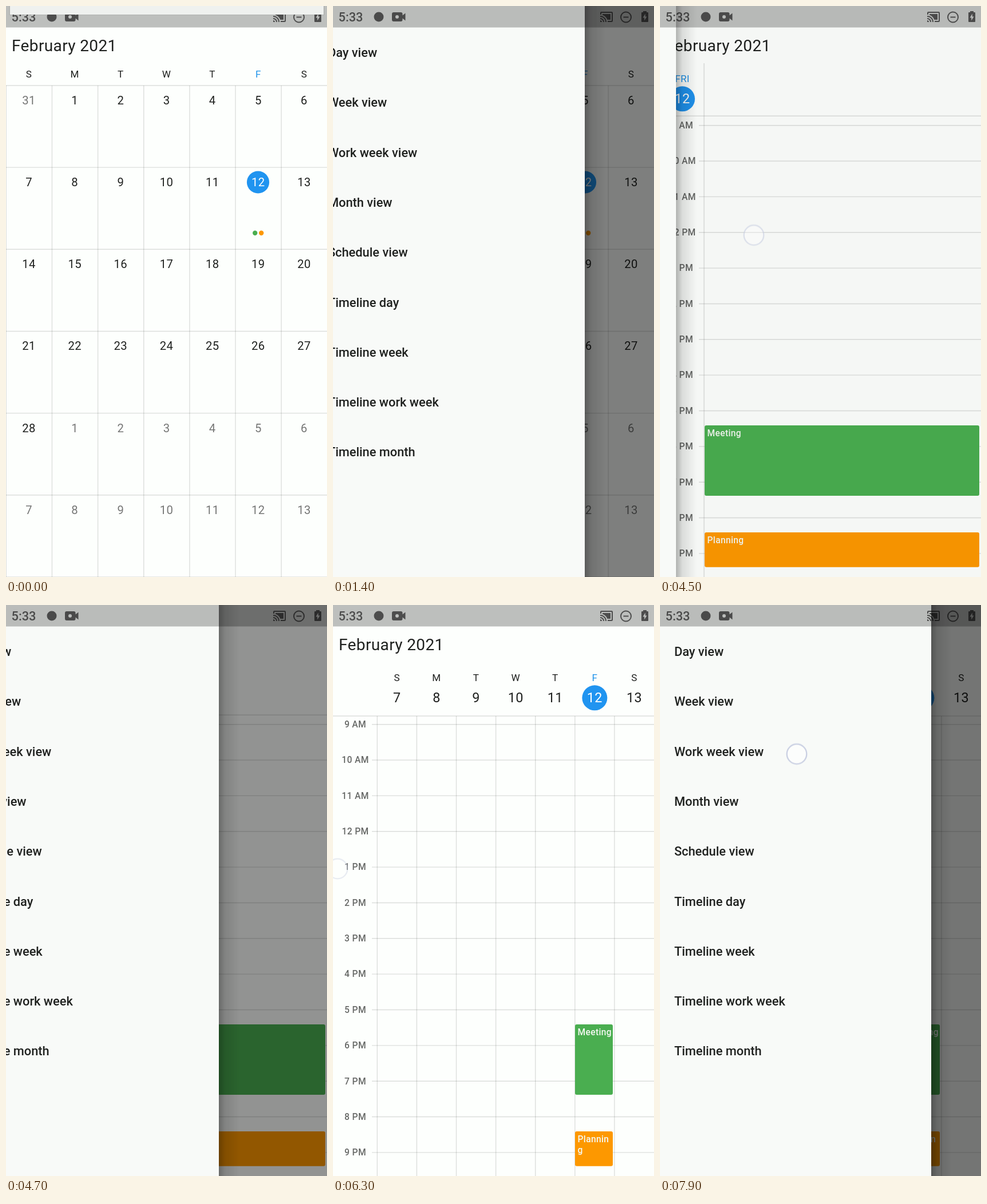
These frames come from a looping animation (561 by 998 pixels, 8 s). An HTML page:

```html
<!DOCTYPE html>
<html lang="en">
<head>
<meta charset="utf-8">
<title>Calendar views</title>
<style>
  @property --edge { syntax: "<number>"; inherits: true; initial-value: -120; }

  html, body { margin: 0; width: 100%; height: 100%; overflow: hidden; background: #fdfffd; }
  svg {
    display: block; width: 100%; height: 100%;
    font-family: Roboto, "Open Sans", sans-serif;
    animation: edge 8s step-end infinite;
  }
  text { fill: #1f211f; white-space: pre; }
  .view text { letter-spacing: .35px; }
  .view .mid { text-anchor: middle; }
  .view .dim { fill: #757675; }
  .view .hour { fill: #666866; font-weight: 500; }
  .view .today { fill: #2094ea; }
  .view .on { fill: #fff; }
  .view .event { fill: #f4f8f2; font-weight: 500; }
  .line { stroke: #000; stroke-opacity: .13; stroke-width: 1.4; }

  .view, #touch, #panel, .bar { animation: 8s step-end infinite; }
  #month { animation-name: month; }
  #day { animation-name: day; }
  #week { animation-name: week; }
  .bar { animation-name: bar; }
  #touch { animation-name: touch; }
  #panel { animation-name: panel; }

  #scrim { fill: #000; opacity: calc(var(--edge) / 474 * .54); }
  #drawer { transform: translateX(calc(var(--edge) * 1px - 474px)); }
  #drawer text { font-size: 21.8px; font-weight: 500; }

  /* right edge of the drawer: three openings, two closings */
  @keyframes edge {
    0%, 41.25%, 75% { --edge: -120; }
    13.75%, 56.25%, 86.25% { --edge: 28; }
    15%, 57.5%, 87.5% { --edge: 211; }
    16.25%, 58.75%, 88.75% { --edge: 372; }
    17.5%, 60%, 90% { --edge: 440; }
    18.75%, 61.25%, 91.25% { --edge: 466; }
    20%, 62.5%, 92.5%, 100% { --edge: 474; }
    40%, 71.25% { --edge: 462; }
    72.5% { --edge: 230; }
    73.75% { --edge: 70; }
  }
  @keyframes month { 0% { opacity: 1; } 36.25%, 100% { opacity: 0; } }
  @keyframes day { 0%, 67.5%, 100% { opacity: 0; } 40% { opacity: 1; } }
  @keyframes week { 0% { opacity: 0; } 68.75%, 100% { opacity: 1; } }
  @keyframes bar {
    0%, 48.75%, 75%, 100% { opacity: 0; }
    40%, 68.75% { opacity: 1; }
    46.25%, 72.5% { opacity: .65; }
    47.5%, 73.75% { opacity: .3; }
  }
  @keyframes panel {
    0% { transform: translateY(0); }
    1.25% { transform: translateY(-5px); }
    2.5% { transform: translateY(-9px); }
    3.75% { transform: translateY(-13px); }
    5%, 100% { transform: translateY(-40px); }
  }
  @keyframes touch {
    0%, 16.25%, 31.25%, 58.75%, 67.5%, 88.75% { opacity: 0; transform: none; }
    11.25% { opacity: 1; transform: translate(8px, 430px); }
    12.5% { opacity: 1; transform: translate(80px, 436px); }
    13.75% { opacity: .6; transform: translate(164px, 442px); }
    15% { opacity: .4; transform: translate(250px, 446px); }

    27.5%, 30% { opacity: .4; transform: translate(263.5px, 79px); }
    28.75% { opacity: 1; transform: translate(263.5px, 79px); }

    51.25% { opacity: 1; transform: translate(8px, 374.5px); }
    53.75% { opacity: 1; transform: translate(36px, 381px); }
    55% { opacity: .9; transform: translate(92px, 392px); }
    56.25% { opacity: .6; transform: translate(164px, 400.5px); }
    57.5% { opacity: .3; transform: translate(250px, 406px); }

    65% { opacity: .6; transform: translate(262px, 170px); }
    66.25% { opacity: .15; transform: translate(262px, 170px); }

    78.75% { opacity: .4; transform: translate(8px, 461px); }
    80% { opacity: .8; transform: translate(8px, 461px); }
    81.25% { opacity: 1; transform: translate(8px, 461px); }
    83.75% { opacity: 1; transform: translate(34px, 465px); }
    85% { opacity: .9; transform: translate(88px, 470px); }
    86.25% { opacity: .7; transform: translate(164px, 474px); }
    87.5% { opacity: .5; transform: translate(250px, 478px); }

    96.25% { opacity: .4; transform: translate(239px, 260.5px); }
    97.5% { opacity: .8; transform: translate(239px, 260.5px); }
    98.75%, 100% { opacity: 1; transform: translate(239px, 260.5px); }
  }
</style>
</head>
<body>
<svg viewBox="0 0 561 998" preserveAspectRatio="none">
  <defs>
    <linearGradient id="shade">
      <stop offset="0" stop-opacity=".28"/>
      <stop offset=".3" stop-opacity=".11"/>
      <stop offset="1" stop-opacity="0"/>
    </linearGradient>
  </defs>
  <rect width="561" height="998" fill="#fdfffd"/>
  <g id="month" class="view"></g>
  <g id="day" class="view"></g>
  <g id="week" class="view"></g>
  <rect id="scrim" width="561" height="998"/>
  <g id="drawer">
    <rect x="474" width="36" height="998" fill="url(#shade)"/>
    <rect width="474" height="998" fill="#f8faf8"/>
  </g>

  <rect width="561" height="37.5" opacity=".25"/>
  <g opacity=".6">
    <text x="9.5" y="27" font-size="21.8" font-weight="500" style="fill:#000">5:33</text>
    <circle cx="80" cy="19" r="8.5"/>
    <path fill-rule="evenodd" d="M106 11h12.500q3 0 3 3v2.500l5-4v13l-5-4v2.500q0 3-3 3H106q-3 0-3-3V14q0-3 3-3zM115 19a3 3 0 1 0-6 0a3 3 0 1 0 6 0z"/>
    <path transform="translate(466 7)" d="M1 18v3h3c0-1.660-1.340-3-3-3zm0-4v2c2.760 0 5 2.240 5 5h2c0-3.870-3.130-7-7-7zm18-7H5v1.630c3.960 1.280 7.090 4.410 8.370 8.370H19V7zM1 10v2c4.970 0 9 4.030 9 9h2c0-6.080-4.930-11-11-11zm20-7H3c-1.100 0-2 .9-2 2v3h2V5h18v14h-7v2h7c1.100 0 2-.9 2-2V5c0-1.100-.9-2-2-2z"/>
    <path fill="none" stroke="#000" stroke-width="2" d="M503 19.500a9 9 0 1 1 18 0a9 9 0 1 1-18 0M507.500 19.500h9"/>
    <path fill-rule="evenodd" d="M542 9h6v2h2q1 0 1 1v15q0 1-1 1h-10q-1 0-1-1V12q0-1 1-1h2zM545.800 13.500l-4.300 7h2.700v5l4.300-7h-2.700z"/>
  </g>
  <g id="panel">
    <rect x="5.500" y="-10" width="551" height="26" opacity=".06"/>
    <rect x="7" y="-10" width="548" height="25" fill="#eff1ef"/>
  </g>
  <circle id="touch" r="17.300" fill="#fff" fill-opacity=".5" stroke="#c9cfe2" stroke-width="2.300"/>
</svg>

<script>
  const NS = "http://www.w3.org/2000/svg";
  const BLUE = "#2094f0", GREEN = "#4aae50", ORANGE = "#fd9800";
  const get = id => document.getElementById(id);

  function add(parent, tag, attrs, text) {
    const el = document.createElementNS(NS, tag);
    for (const key in attrs) el.setAttribute(key, attrs[key]);
    if (text !== undefined) el.textContent = text;
    parent.append(el);
  }
  const write = (g, x, y, size, text, cls = "mid") =>
    add(g, "text", { x, y, "font-size": size, class: cls }, text);
  const line = (g, x1, y1, x2, y2) => add(g, "line", { x1, y1, x2, y2, class: "line" });
  const dot = (g, cx, cy, r, fill) => add(g, "circle", { cx, cy, r, fill });
  const title = g => write(g, 10, 79, 28.05, "February 2021", "");

  function buildMonth(g) {
    const w = 561 / 7, h = 143.15, top = 139;
    title(g);
    for (let c = 0; c < 7; c++) {
      line(g, c * w + .3, top, c * w + .3, 998);
      write(g, (c + .5) * w, 125, 17.1, "SMTWTFS"[c], c === 5 ? "mid today" : "mid");
    }
    for (let r = 0; r <= 6; r++) line(g, 0, top + r * h, 561, top + r * h);
    dot(g, 440.5, 308, 19.6, BLUE);
    dot(g, 435.2, 396.8, 4.2, GREEN);
    dot(g, 446.2, 396.8, 4.2, ORANGE);
    for (let i = 0; i < 42; i++) {
      const num = i < 1 ? 31 : i > 28 ? i - 28 : i;
      const cls = i < 1 || i > 28 ? "mid dim" : i === 12 ? "mid on" : "mid";
      write(g, (i % 7 + .5) * w, 172 + Math.floor(i / 7) * h, 20.25, num, cls);
    }
  }

  function buildHours(g) {
    for (let i = 0; i < 13; i++) {
      const y = 208.7 + i * 62.35, hour = (8 + i) % 12 + 1;
      line(g, 68, y, 561, y);
      write(g, 39, y + 5.3, 15.6, hour + (i < 3 ? " AM" : " PM"), "mid hour");
    }
    add(g, "rect", { x: 552, y: 486, width: 9, height: 434, fill: "#bcbcbc", "fill-opacity": .4, class: "bar" });
  }

  function event(g, x, width, y, height, fill, lines) {
    add(g, "rect", { x, y, width, height, rx: 3, fill });
    lines.forEach((s, i) => write(g, x + 4.5, y + 18.7 + i * 19.5, 15.6, s, "event"));
  }
  const meeting = (g, x, w) => event(g, x, w, 733, 123, GREEN, ["Meeting"]);
  const planning = (g, x, w, lines) => event(g, x, w, 920, 60.7, ORANGE, lines);

  function dayHead(g, x, name, num, today) {
    if (today) dot(g, x, 162.3, 22, BLUE);
    write(g, x, 133, 17.1, name, today ? "mid today" : "mid");
    write(g, x, 170.4, 23.4, num, today ? "mid on" : "mid");
  }

  function buildDay(g) {
    title(g);
    line(g, 77, 100, 77, 998);
    line(g, 0, 192.3, 561, 192.3);
    dayHead(g, 39, "FRI", 12, true);
    buildHours(g);
    meeting(g, 78, 480);
    planning(g, 78, 480, ["Planning"]);
  }

  function buildWeek(g) {
    const w = 69.1;
    title(g);
    line(g, 0, 194, 561, 194);
    buildHours(g);
    for (let c = 0; c < 7; c++) {
      const x = 77.3 + c * w;
      line(g, x, 194, x, 998);
      dayHead(g, x + w / 2, "SMTWTFS"[c], 7 + c, c === 5);
    }
    meeting(g, 423, 66);
    planning(g, 423, 66, ["Plannin", "g"]);
  }

  function buildDrawer(g) {
    const items = ["Day view", "Week view", "Work week view", "Month view", "Schedule view",
      "Timeline day", "Timeline week", "Timeline work week", "Timeline month"];
    items.forEach((s, i) => add(g, "text", { x: 24.9, y: 89 + i * 87.3 }, s));
  }

  buildMonth(get("month"));
  buildDay(get("day"));
  buildWeek(get("week"));
  buildDrawer(get("drawer"));
</script>
</body>
</html>
```
